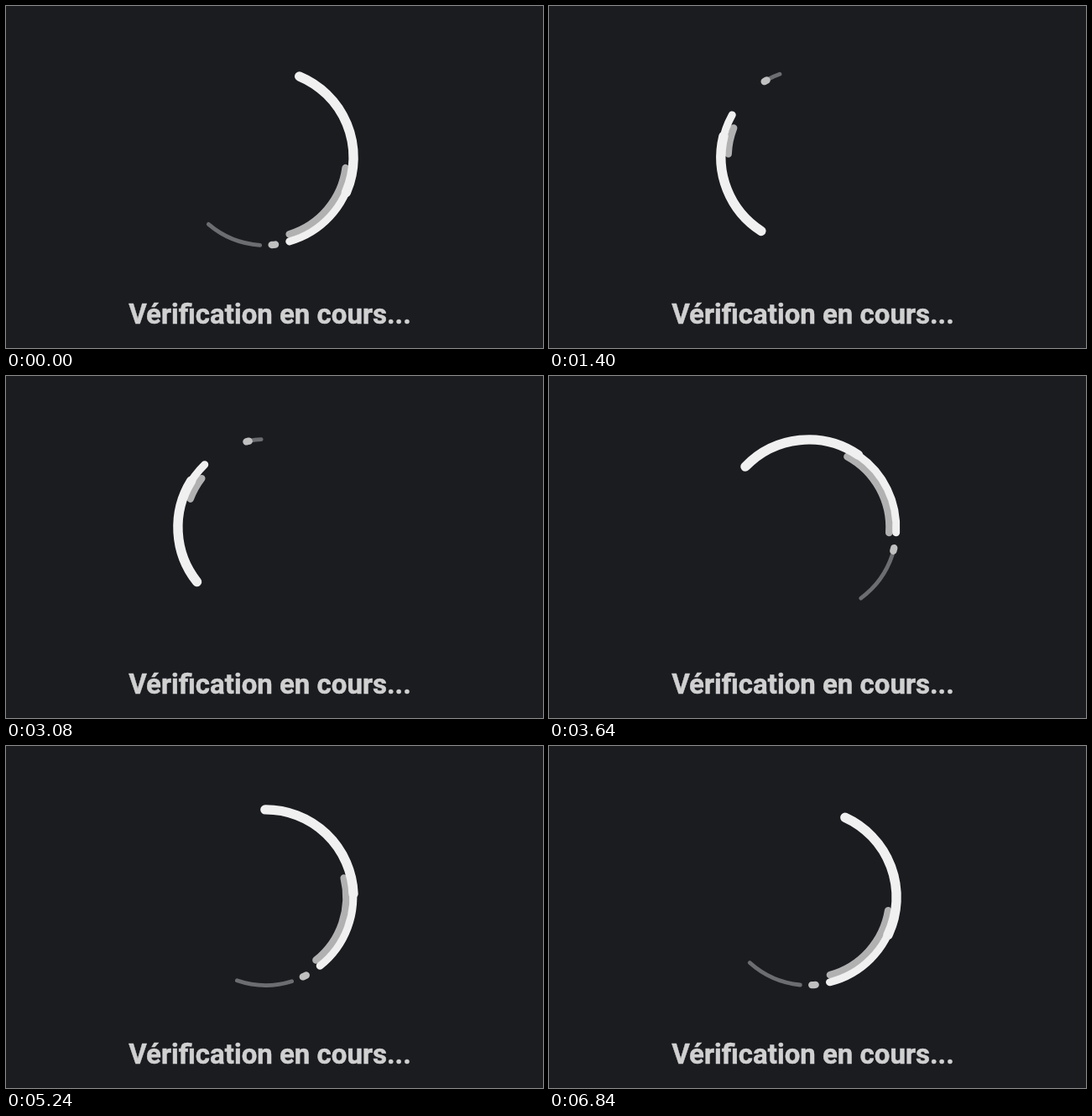
Animation of 640x408 px, one loop 6.88 s. Source, as an HTML page with a canvas:

```html
<!DOCTYPE html>
<html lang="fr">
<head>
<meta charset="utf-8">
<title>Vérification</title>
<style>
  html, body { margin: 0; width: 100%; height: 100%; overflow: hidden; background: #1b1c20; }
  canvas, svg { position: absolute; left: 0; top: 0; width: 640px; height: 408px; }
  text {
    font: 700 33px Roboto, "Open Sans", sans-serif;
    fill: #d0d0d1; stroke: #d0d0d1; stroke-width: 0.5px; text-anchor: middle;
  }
</style>
</head>
<body>
<canvas id="stage" width="640" height="408"></canvas>
<svg viewBox="0 0 640 408"><text x="314.5" y="379">Vérification en cours...</text></svg>
<script>
const LOOP = 6880;
const CX = 309.5, CY = 180.5;
const canvas = document.getElementById('stage');
const ctx = canvas.getContext('2d');
const ratio = window.devicePixelRatio || 1;
canvas.width = 640 * ratio;
canvas.height = 408 * ratio;
ctx.scale(ratio, ratio);
ctx.lineCap = 'round';

// Each cycle makes two turns counter-clockwise; the arc ends drift
// around that rotation by the angles (degrees) given at these phases.
const KEYS = [0, 0.055, 0.186, 0.442, 0.7907];
const arcs = [
  { r: 105, w: 4.8, color: '#6c6d70',
    from: [94.1, 112.7, 87.5, 76, 109], to: [130.8, 148.9, 122.6, 113.9, 116.8] },
  { r: 104.7, w: 8.4, color: '#c0c0c1',
    from: [84.1, 102.5, 89.7, 75.3, 107], to: [86.5, 104.9, 91.1, 76.5, 108.8] },
  { r: 96, w: 8.6, color: '#b1b1b2',
    from: [8, 26.1, 15.9, -8.5, 50.4], to: [73.3, 91.3, 80.9, 49.8, 67.1] },
  { r: 104.3, w: 9, color: '#f0f0f0',
    from: [12, 29, 28.1, -12, 36], to: [74.7, 91.6, 78.7, 32.6, 75.5] },
  { r: 104.6, w: 11.4, color: '#f0f0f0',
    from: [-67, -50.4, -54.1, -41.2, -8.7], to: [24, 37.7, 15.7, 8.2, 61.7] }
];

// Periodic monotone cubic through the key values.
function curve(values) {
  const n = KEYS.length;
  const at = i => values[(i + n) % n];
  const span = i => {
    const k = (i + n) % n;
    return (k === n - 1 ? 1 : KEYS[k + 1]) - KEYS[k];
  };
  const slope = i => (at(i + 1) - at(i)) / span(i);
  const tangents = values.map((_, i) => {
    const a = slope(i - 1), b = slope(i);
    if (a * b <= 0) return 0;
    const ha = span(i - 1), hb = span(i);
    const wa = 2 * hb + ha, wb = hb + 2 * ha;
    return (wa + wb) / (wa / a + wb / b);
  });
  return u => {
    let i = n - 1;
    while (KEYS[i] > u) i--;
    const h = span(i), s = (u - KEYS[i]) / h, q = 1 - s;
    return at(i) * (1 + 2 * s) * q * q + tangents[i] * h * s * q * q +
      at(i + 1) * s * s * (3 - 2 * s) - tangents[(i + 1) % n] * h * s * s * q;
  };
}

for (const arc of arcs) {
  arc.start = curve(arc.from);
  arc.end = curve(arc.to);
}

// The second part runs slightly faster, so the loop closes after four cycles.
function phase(t) {
  const turn = t < 4200 ? t / 1720 : 4200 / 1720 + (t - 4200) / 1696.5;
  return Math.min(turn, 3.998) % 1;
}

function draw(t) {
  const u = phase(t);
  const rad = deg => (deg - 720 * u) * Math.PI / 180;
  ctx.fillStyle = '#1b1c20';
  ctx.fillRect(0, 0, 640, 408);
  for (const arc of arcs) {
    ctx.strokeStyle = arc.color;
    ctx.lineWidth = arc.w;
    ctx.beginPath();
    ctx.arc(CX, CY, arc.r, rad(arc.start(u)), rad(arc.end(u)));
    ctx.stroke();
  }
}

const begin = performance.now();
function tick() {
  draw((performance.now() - begin) % LOOP);
  requestAnimationFrame(tick);
}
tick();
</script>
</body>
</html>
```
